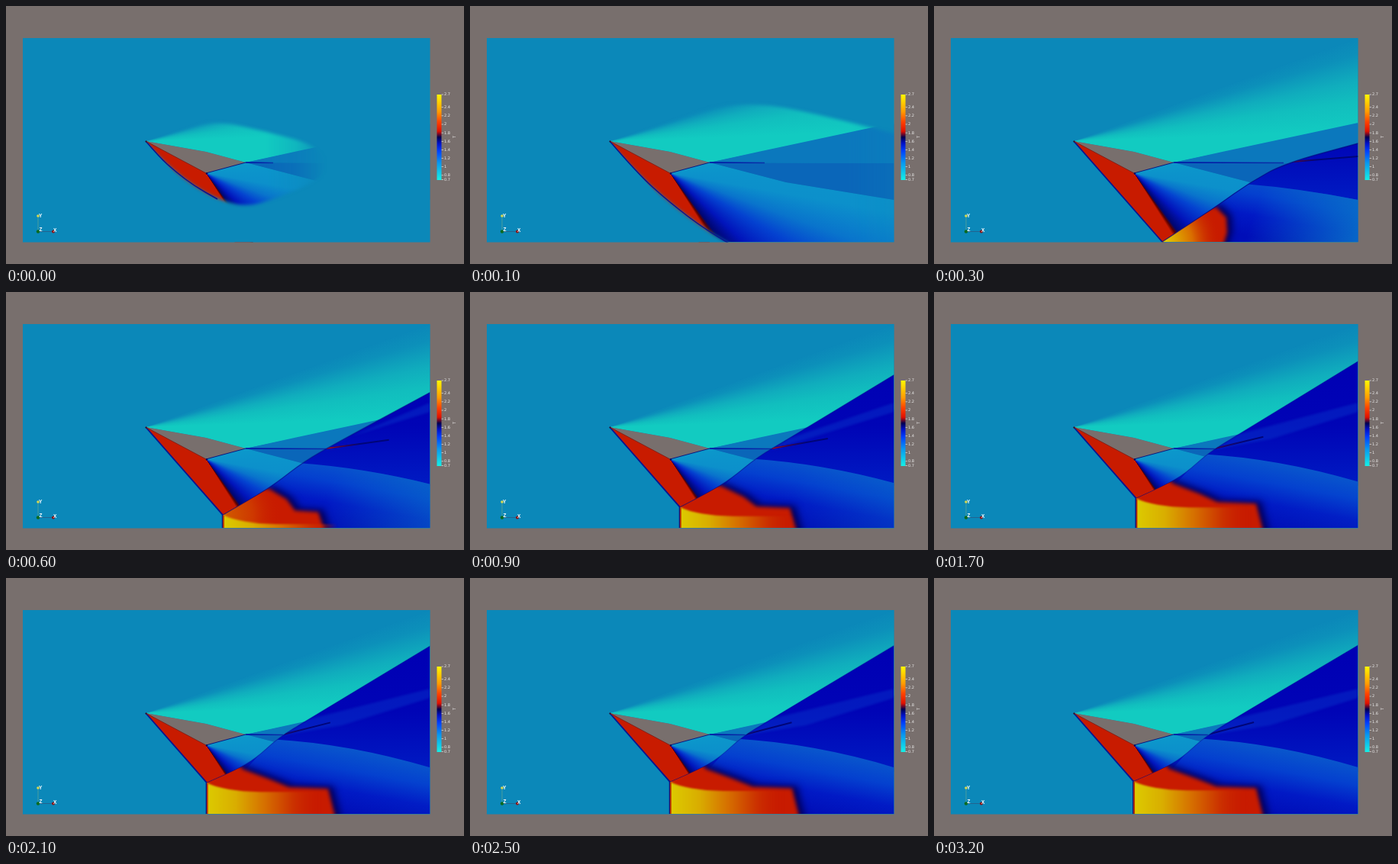
Animation of 600x338 px, one loop 3.3 s. Source, as an HTML page with a canvas:

```html
<!DOCTYPE html>
<html lang="en">
<head>
<meta charset="utf-8">
<title>Supersonic wedge flow</title>
<style>
html, body { margin: 0; width: 100%; height: 100%; overflow: hidden; background: #786f6d; }
canvas { display: block; }
</style>
</head>
<body>
<canvas id="stage" width="600" height="338"></canvas>
<script>
const stage = document.getElementById('stage').getContext('2d');
const layer = document.createElement('canvas');
layer.width = 600;
layer.height = 338;
const g = layer.getContext('2d');

const GREY = '#786f6d', FREE = '#0b88b9', RED = '#c81b00', NAVY = '#000878';
const LEFT = 22, TOP = 42, RIGHT = 555.5, FLOOR = 309;
const TIP = [183, 177], CREST = [262, 191], TAIL = [314, 205], KEEL = [262, 219];

// The shock system relaxes exponentially from its first wall contact to the settled pose
function stateAt(step) {
  const u = Math.exp((3 - step) / 6);
  const mix = (settled, early) => settled + (early - settled) * u;
  const at = (x, y, dx, dy) => [x + dx * u, y + dy * u];
  return {
    u,
    foot: at(261, 266, 38, 43),
    shock: [at(297, 251, 43, 31), at(325, 235, 47, 26), at(354, 208, 60, 23), at(393, 184, 67, 22),
      [RIGHT, 88 + 92 * u ** 1.5]],
    hot: [at(308, 250, 61, 13), at(344, 263, 39, 14), at(370, 273, 14, 22)],
    edge: 434 - 58 * u ** 3,
    wake: Math.min(mix(358, 460), 314 + 36 * (step + 1)),
    wakeEnd: at(418, 189, 138, 8),
    heat: Math.min(.9, 3 * u)
  };
}

function poly(c, points) {
  c.beginPath();
  points.forEach(p => c.lineTo(...p));
}

function fill(points, style, blur = 0) {
  g.filter = blur ? `blur(${blur}px)` : 'none';
  poly(g, points);
  g.closePath();
  g.fillStyle = style;
  g.fill();
  g.filter = 'none';
}

function line(c, points, color, width) {
  poly(c, points);
  c.strokeStyle = color;
  c.lineWidth = width;
  c.stroke();
}

// Colours spread evenly unless given as [position, colour]
function addStops(grad, stops, span = 1) {
  stops.forEach((s, i) => {
    const [at, color] = Array.isArray(s) ? s : [i / (stops.length - 1), s];
    grad.addColorStop(at / span, color);
  });
  return grad;
}

const ramp = (x0, y0, x1, y1, stops) => addStops(g.createLinearGradient(x0, y0, x1, y1), stops);

// Angular gradient; stops are in degrees, starting 20 degrees above the horizontal
const fan = ([x, y], stops) => addStops(g.createConicGradient(-Math.PI / 9, x, y), stops, 360);

// Smooth curve through points, continuing the current path
function curve(c, points) {
  points.forEach((p, i) => {
    const next = points[i + 1];
    if (next) c.quadraticCurveTo(...p, (p[0] + next[0]) / 2, (p[1] + next[1]) / 2);
    else c.lineTo(...p);
  });
}

function drawSteady(s) {
  fill([TIP, [RIGHT, 42], [RIGHT, 155], TAIL, CREST],
    fan(TIP, [[0, FREE], [3, '#0c90ba'], [8, '#10adbd'], [12, '#11bebe'], [18, '#12cbc1'], [40, '#12cbc1'], [60, FREE]]));

  const [fx, fy] = s.foot;
  fill([TIP, s.foot, [fx, FLOOR], [RIGHT, FLOOR], [RIGHT, 254], [414, 231], TAIL, KEEL],
    fan(KEEL, [[0, '#0c9acb'], [30, '#0c90cb'], [40, '#0974cc'], [50, '#0442d0'], [63, '#0114bb'],
      [73, '#000670'], [75.5, '#5a0000'], [78, RED], [270, RED], [340, '#0c9acb']]));

  fill([TAIL, [380, 190.5], [RIGHT, 153], [RIGHT, 206], [460, 206]], '#0b78bd');
  fill([TAIL, [460, 206], [RIGHT, 206], [RIGHT, 254], [414, 231]], '#0a66b9');
  line(g, [TAIL, [s.wake, 205.5]], ramp(314, 0, s.wake, 0, ['#0008a0', '#0a30a8']), 1.3);
}

function drawReflected(s) {
  const { u, foot, shock, hot, edge, wake, wakeEnd, heat } = s;
  const [fx, fy] = foot;
  const [a, b, c, d] = shock;
  const early = Math.min(1, u);
  g.save();
  g.beginPath();
  g.moveTo(...foot);
  curve(g, shock);
  g.lineTo(RIGHT, FLOOR);
  g.lineTo(fx, FLOOR);
  g.closePath();
  g.clip();

  g.fillStyle = ramp(0, 100, 0, 250, ['#0000b4', '#0004b6', '#001ac2']);
  g.fillRect(LEFT, TOP, RIGHT - LEFT, FLOOR - TOP);
  fill([d, [RIGHT, 145], [RIGHT, 157], [440, 193], [wake, 206]], 'rgba(8,60,205,.4)', 1.5);

  // Brighter blue beneath the transmitted tail shock, brightest downstream at first
  g.beginPath();
  g.moveTo(c[0] - 8, c[1] + 2);
  g.quadraticCurveTo((c[0] + RIGHT) / 2 - 5, c[1] + 8, RIGHT, 248 + 6 * early);
  g.lineTo(RIGHT, FLOOR);
  g.lineTo(fx, FLOOR);
  g.lineTo(...b);
  g.closePath();
  g.fillStyle = ramp(430, 220, 415, 302, ['#0956cc', '#0440cf', '#0119c5', '#000eb8']);
  g.fill();
  g.fillStyle = ramp(425, 255, 560, 300, ['rgba(8,112,200,0)', `rgba(8,112,200,${early * .9})`]);
  g.fill();

  // Wake sheet with a hot streak that cools
  line(g, [[wake, 205], wakeEnd], '#000578', 2);
  const x = wake + 45;
  const y = 205 + (wakeEnd[1] - 205) * 45 / (wakeEnd[0] - wake);
  line(g, [[wake, 205], [x, y]],
    ramp(wake, 0, x, 0, [`rgba(205,20,10,${heat})`, 'rgba(100,0,20,0)']), 1.6);

  // Hot zone with a dark rim, then the hottest gas behind the stem
  const last = hot[2];
  const zone = [[fx - 8, FLOOR + 15], [fx - 8, fy], [a[0], a[1] - 12], ...hot,
    [Math.max(last[0], edge - 12), last[1] + 2], [edge, FLOOR + 15]];
  fill(zone.map(([x, y], i) => i > 2 ? [x + 7, y - 3] : [x, y]), '#00005c', 5);
  fill(zone, RED, 2.5);

  const young = Math.min(1, Math.max(0, (fy - 283) / 26));
  const glow = g.createRadialGradient(fx, fy, 3, fx, fy, 76);
  g.fillStyle = addStops(glow, [`rgba(225,205,0,${young})`, `rgba(217,110,0,${young})`, 'rgba(200,27,0,0)']);
  g.fillRect(fx, fy - 80, 90, 90);

  g.filter = 'blur(1px)';
  g.beginPath();
  g.moveTo(fx, fy);
  g.quadraticCurveTo(fx + 22, fy + 11, fx + 70, fy + 12);
  g.lineTo(fx + 150, fy + 12);
  g.lineTo(fx + 150, FLOOR + 15);
  g.lineTo(fx, FLOOR + 15);
  g.closePath();
  g.fillStyle = ramp(fx, 0, fx + 150, 0, ['#dccb00', '#d9ae00', '#d67100', '#cb3300', 'rgba(200,27,0,0)']);
  g.fill();
  g.filter = 'none';
  g.restore();

  g.beginPath();
  g.moveTo(...foot);
  curve(g, shock);
  g.strokeStyle = `rgba(0,8,130,${.25 + .45 * early})`;
  g.lineWidth = 1.3;
  g.stroke();
  line(g, [[fx - .5, fy], [fx - .5, FLOOR]], '#10107c', 1.4);
  line(g, [[fx + 1, fy + 1], [fx + 1, FLOOR]], '#b82800', 1.5);
}

// Early disturbance, self-similar about the leading tip
function maskYoung(step) {
  const bow = [[201, 198], [222, 217], [247, 236], [277, 253]];
  const rest = [[314, 263], [352, 253], [424, 222], [412, 184], [340, 164], [270, 149], [220, 165], TIP];
  g.save();
  g.translate(...TIP);
  g.scale(step + 1, step + 1);
  g.translate(-TIP[0], -TIP[1]);
  g.globalCompositeOperation = 'destination-in';
  g.filter = 'blur(2px)';
  g.beginPath();
  g.moveTo(181, 176);
  curve(g, [...bow, ...rest]);
  g.fillStyle = ramp(340, 0, 419, 0, ['#000', 'rgba(0,0,0,.7)', 'rgba(0,0,0,0)']);
  g.fill();
  g.globalCompositeOperation = 'source-over';
  g.filter = 'none';
  g.beginPath();
  g.moveTo(...TIP);
  curve(g, bow);
  g.strokeStyle = '#0a1490';
  g.lineWidth = 1.5 / (step + 1);
  g.stroke();
  g.restore();
}

function drawLegend() {
  const c = stage;
  c.fillStyle = addStops(c.createLinearGradient(0, 116, 0, 228),
    ['#fff800', [.2, '#ff9c00'], [.32, '#ff4200'], [.43, '#e01000'], [.5, '#000050'],
      [.57, '#0010c8'], [.66, '#0040ff'], [.8, '#0898f0'], [1, '#14f0e6']].map((s, i) => i ? s : [0, s]));
  c.fillRect(564.5, 116, 6, 112);
  c.fillStyle = '#eee';
  c.font = '5px "DejaVu Sans", Arial, sans-serif';
  c.textBaseline = 'middle';
  const label = v => {
    const y = 116 + (2.7 - v) * 55.7;
    c.fillRect(570.5, y - .3, 2.5, .6);
    c.fillText(v, 574, y + .2);
  };
  label(2.7);
  for (let n = 4; n <= 12; n++) label(n / 5);
  label(.7);
  c.save();
  c.translate(588, 173);
  c.rotate(-Math.PI / 2);
  c.fillText('T', 0, 0);
  c.restore();
}

function dot(x, y, r, color) {
  stage.beginPath();
  stage.arc(x, y, r, 0, 7);
  stage.fillStyle = color;
  stage.fill();
}

function drawAxes() {
  const c = stage;
  line(c, [[42, 295], [42, 276]], '#4a9c9c', 1);
  line(c, [[42, 295.5], [61, 295.5]], '#23638f', 1);
  dot(42, 275, 1.8, '#d8d850');
  dot(42, 295.5, 2.2, '#0a6a20');
  dot(62, 295.5, 2, '#8c1010');
  c.fillStyle = '#fff';
  c.font = 'bold 6.5px "Liberation Sans", Arial, sans-serif';
  c.textBaseline = 'middle';
  c.fillText('Y', 43, 275);
  c.fillText('Z', 43.5, 293.5);
  c.fillText('X', 62, 294);
}

function draw(step) {
  const s = stateAt(step);
  g.clearRect(0, 0, 600, 338);
  g.save();
  g.beginPath();
  g.rect(LEFT, TOP, RIGHT - LEFT, FLOOR - TOP + .5);
  g.clip();
  drawSteady(s);
  if (step >= 2) drawReflected(s);
  if (step < 3) maskYoung(step);
  else line(g, [TIP, s.foot], '#0a1490', 1.8);
  g.restore();

  stage.fillStyle = GREY;
  stage.fillRect(0, 0, 600, 338);
  stage.fillStyle = FREE;
  stage.fillRect(LEFT, TOP, RIGHT - LEFT, FLOOR - TOP + .5);
  stage.drawImage(layer, 0, 0);
  poly(stage, [TIP, CREST, TAIL, KEEL]);
  stage.fillStyle = GREY;
  stage.fill();
  line(stage, [TIP, KEEL], '#8c1c10', 1);
  line(stage, [KEEL, TAIL], '#0a1880', 1);
  dot(183.5, 177.5, 1, '#301020');
  dot(263, 219.5, 1.2, '#000860');
  drawLegend();
  drawAxes();
}

const start = performance.now();
let shown = -1;
function tick() {
  const step = Math.floor((performance.now() - start) % 3300 / 100);
  if (step !== shown) draw(shown = step);
  requestAnimationFrame(tick);
}
tick();
</script>
</body>
</html>
```
